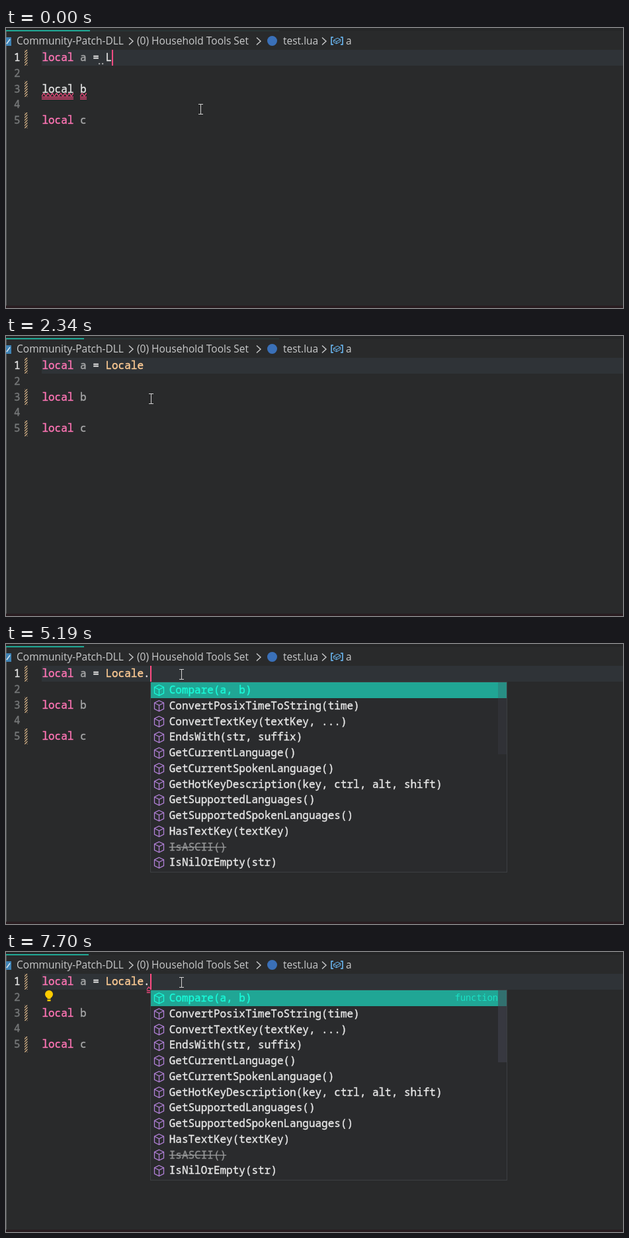
These frames come from a looping animation (933 px wide and 424 px high, 8 s). An HTML page with a canvas:

```html
<!DOCTYPE html>
<html lang="en">
<head>
<meta charset="utf-8">
<title>Lua completion</title>
<style>
  html, body { margin: 0; width: 100%; height: 100%; overflow: hidden; background: #292a2b; }
  canvas { display: block; }
</style>
</head>
<body>
<canvas id="stage" width="933" height="424"></canvas>
<script>
const ctx = document.getElementById('stage').getContext('2d');
const LOOP = 8000, CH = 9.6, LINE = 23.75, LEFT = 54.4;
const MONO = '16px "Noto Sans Mono", monospace';
const UI = '15.5px "Open Sans", sans-serif';
const C = {
  bg: '#292a2b', panel: '#2f3337', border: '#3c3f42', fg: '#e6e6e6', dim: '#a6a7a8',
  pink: '#ff75b5', caret: '#ff4b82', orange: '#ffcc95', blue: '#6fc1ff', link: '#4591d6',
  teal: '#19f9d8', selected: '#20a695', purple: '#b180d7', number: '#757778'
};
const col = n => LEFT + n * CH;

// A leading "-" marks a deprecated entry.
const members = ['Compare(a, b)', 'ConvertPosixTimeToString(time)', 'ConvertTextKey(textKey, ...)',
  'EndsWith(str, suffix)', 'GetCurrentLanguage()', 'GetCurrentSpokenLanguage()',
  'GetHotKeyDescription(key, ctrl, alt, shift)', 'GetSupportedLanguages()',
  'GetSupportedSpokenLanguages()', 'HasTextKey(textKey)', '-IsASCII()', 'IsNilOrEmpty(str)'];
const withC = [...members.slice(0, 3), 'GetCurrentLanguage()', 'GetCurrentSpokenLanguage()',
  'SetCurrentLanguage(langType)', 'SetCurrentSpokenLanguage(langType)',
  'GetHotKeyDescription(key, ctrl, alt, shift)', '-IsASCII()', '-LocalSystemCPToUTF8(...)',
  'TruncateString(str, ...)'];
const withCo = [...members.slice(0, 3), 'GetCurrentSpokenLanguage()',
  'SetCurrentSpokenLanguage(langType)', '-LocalSystemCPToUTF8(...)'];
const globals = ['Locale', 'load', 'loadfile', 'loadstring', 'LookUpControl', 'loadlib', 'select'];
const fields = ['Compare', 'ConvertPosixTimeToString', 'ConvertTextKey', 'EndsWith',
  'GetCurrentLanguage', 'GetCurrentSpokenLanguage', 'GetHotKeyDescription',
  'GetSupportedLanguages', 'GetSupportedSpokenLanguages', 'HasTextKey', 'IsASCII',
  'IsNilOrEmpty', 'IsNilOrWhitespace'];

const list = (at, query, rows) => ({ list: { at, query, rows } });
const warn = (at, n, color = C.orange) => ({ mark: { at, n, color } });

// Each step changes part of the editor state from its time on.
const steps = [
  [0, { code: 'L', caret: 1, stale: 1, hint: 1, detail: '', scroll: 0, tab: 127, strip: 1, mouse: [294, 123] }],
  [130, list(11, 'L', globals)],
  [280, { code: 'Lo', hint: 0, ...list(12, 'Lo', globals.slice(0, 6)) }],
  [410, { stale: 0, ...warn(10, 2) }],
  [550, { detail: 'Locale' }],
  [690, { code: 'Loc', ...list(13, 'Loc', ['Locale', 'LookUpControl']) }],
  [810, warn(10, 3)],
  [930, { code: 'Loca', ...list(14, 'Loca', ['Locale']) }],
  [1050, warn(10, 4)],
  [1200, { code: 'Local', tab: 125, strip: 0, ...list(15, 'Local', ['Locale']) }],
  [1320, warn(10, 5)],
  [1470, { code: 'Locale', ...list(16, 'Locale', ['Locale']) }],
  [1710, { mark: null }],
  [1860, { list: null, tab: 118, strip: 1 }],
  [1980, { caret: 0, mouse: [286, 120] }],
  [2100, { mouse: [262, 111] }],
  [2220, { mouse: [236, 101] }],
  [2340, { mouse: [219, 95] }],
  [2490, { caret: 1, mouse: [184, 63] }],
  [2640, { mouse: [181, 53] }],
  [2790, { link: 1, strip: 0, mouse: [196, 45] }],
  [2860, { hover: 1 }],
  [3030, { caret: 0 }],
  [3400, { caret: 1 }],
  [3940, { caret: 0 }],
  [4060, { hover: 0, mouse: [203, 45] }],
  [4180, { link: 0, mouse: [226, 46] }],
  [4300, { mouse: [252, 46] }],
  [4420, { caret: 1, mouse: [265, 46] }],
  [4920, { caret: 0 }],
  [5070, { caret: 1, code: 'Locale.' }],
  [5190, { detail: '', scroll: .25, ...list(17, '', members) }],
  [5310, { detail: 'function' }],
  [5460, { tab: 125 }],
  [5580, { caret: 0 }],
  [5820, { scroll: 0 }],
  [6120, { caret: 1 }],
  [6270, { code: 'Locale.C' }],
  [6420, list(18, 'C', withC)],
  [6570, warn(17, 1)],
  [6850, { code: 'Locale.Co', ...list(19, 'Co', withCo) }],
  [6970, warn(17, 2)],
  [7340, { code: 'Locale.C', ...warn(17, 1), ...list(18, 'C', withC) }],
  [7460, { code: 'Locale.', mark: null, detail: '', scroll: .25, ...list(17, '', members) }],
  [7580, { detail: 'function', scroll: .55 }],
  [7700, { bulb: 1, ...warn(16.5, .6, C.caret) }]
];

function rect(x, y, w, h, color) {
  ctx.fillStyle = color;
  ctx.fillRect(x, y, w, h);
}
function text(str, x, y, color, font = MONO) {
  ctx.font = font;
  ctx.fillStyle = color;
  ctx.fillText(str, x, y);
  if (font !== MONO) return;
  // A hairline outline gives the code its slightly heavier weight.
  ctx.strokeStyle = color;
  ctx.lineWidth = .4;
  ctx.strokeText(str, x, y);
}
function line(points, color, width = 1.3, close = false) {
  ctx.beginPath();
  points.forEach(([x, y]) => ctx.lineTo(x, y));
  if (close) ctx.closePath();
  ctx.strokeStyle = color;
  ctx.lineWidth = width;
  ctx.stroke();
}
function at(x, y, draw, scale = 1) {
  ctx.save();
  ctx.translate(x, y);
  ctx.scale(scale, scale);
  draw();
  ctx.restore();
}
function frame(x, y, w, h, fill) {
  rect(x, y, w, h, fill);
  ctx.strokeStyle = C.border;
  ctx.lineWidth = 1;
  ctx.strokeRect(x + .5, y + .5, w - 1, h - 1);
}

function cube(color) {
  line([[0, -8], [7, -4.5], [7, 4.5], [0, 8], [-7, 4.5], [-7, -4.5]], color, 1.3, true);
  line([[-7, -4.5], [0, -1], [7, -4.5]], color);
  line([[0, -1], [0, 8]], color);
}
function flatBox(color) {
  line([[-8, -1], [1, -6], [8, -3], [8, 2], [-1, 7], [-8, 3.5]], color, 1.5, true);
  line([[-8, -1], [-1, 2], [8, -3]], color, 1.5);
  line([[-1, 2], [-1, 7]], color, 1.5);
}

function underline(x, y, w, color) {
  const wave = [];
  for (let i = 0; i <= w; i++) wave.push([x + i, y + 2 * Math.cos(i * Math.PI / 3.2)]);
  line(wave, color, 1.2);
  rect(x, y + 3, w, 1.3, color);
  rect(x, y + 5.8, w, 1.3, color);
}

function breadcrumbs({ tab, strip }) {
  rect(0, 0, 933, 4, '#252627');
  if (strip) rect(0, 3.5, 413, 1.3, '#2b3c3d');
  rect(0, 3.3, tab, 1.7, '#1fbfa9');
  rect(0, 5, 1, 416, '#5a5c5d');
  rect(0, 420.5, 933, 3.5, '#291c20');
  rect(0, 14, 8, 13, '#3f83b5');
  line([[1, 24], [6, 17]], '#d7e6f2', 1.5);
  const color = '#c9cacb';
  text('Community-Patch-DLL', 16, 25, color, UI);
  text('(0) Household Tools Set', 198, 25, color, UI);
  text('test.lua', 419, 25, color, UI);
  text('a', 514, 25, color, UI);
  for (const x of [186, 379, 478]) line([[x, 14.5], [x + 6, 20], [x, 25.5]], color, 1.4);
  ctx.beginPath();
  ctx.arc(402.5, 19.5, 7.5, 0, 7);
  ctx.fillStyle = '#3a70b8';
  ctx.fill();
  line([[495, 14], [492, 14], [492, 25], [495, 25]], C.blue, 1.5);
  line([[506, 14], [509, 14], [509, 25], [506, 25]], C.blue, 1.5);
  at(500.5, 19.2, () => flatBox(C.blue), .65);
}

function gutter(row) {
  const y = 33 + row * LINE;
  text(row + 1, 12, y + 17, row ? C.number : C.fg);
  if (row % 2) return;
  ctx.save();
  ctx.beginPath();
  ctx.rect(28, y, 4.5, LINE);
  ctx.clip();
  for (let d = 0; d < 32; d += 4) line([[27, y + d + 1], [33, y + d - 5]], '#f0c794', 1.2);
  ctx.restore();
}

function editor(s) {
  rect(54, 33, 879, 24, C.panel);
  for (let row = 0; row < 5; row++) gutter(row);
  ['a', 'b', 'c'].forEach((name, i) => {
    const y = 50 + i * 2 * LINE, stale = i === 1 && s.stale;
    text('local', col(0), y, stale ? C.fg : C.pink);
    text(name, col(6), y, stale ? C.fg : C.dim);
  });
  text('=', col(8), 50, C.fg);
  if (s.stale) {
    underline(54, 101, 48, C.caret);
    underline(112, 101, 10, C.caret);
  }
  if (s.hint) for (const x of [140, 145]) rect(x, 53, 2.2, 2.2, '#9a9b9c');
  const known = s.code.startsWith('Locale') ? 6 : 0;
  text(s.code.slice(0, known), col(10), 50, s.link ? C.link : C.orange);
  text(s.code.slice(known), col(10 + known), 50, C.fg);
  if (s.link) rect(col(10), 52, 6 * CH, 1.2, C.link);
  if (s.mark) underline(col(s.mark.at), 55, s.mark.n * CH, s.mark.color);
  if (s.caret) rect(Math.round(col(10 + s.code.length)), 33, 2, 24, C.caret);
}

function entry(label, query, x, y, color) {
  let next = 0;
  [...label].forEach((ch, i) => {
    const hit = next < query.length && ch.toLowerCase() === query[next].toLowerCase();
    if (hit) next++;
    text(ch, x + i * CH, y, hit ? C.blue : color, hit ? 'bold ' + MONO : MONO);
  });
}

function completions({ list: { at: column, query, rows }, detail, scroll }) {
  const x = Math.round(col(column) + 1.2), w = 539;
  frame(x - 1, 57, w + 1, rows.length * LINE + 4, '#2a2b2d');
  rect(x, 58, w - 1, 24, C.selected);
  rows.forEach((row, i) => {
    const y = 75 + i * LINE, old = row[0] === '-';
    const label = old ? row.slice(1) : row;
    const tint = i ? C.purple : C.teal;
    at(x + 12.5, y - 5, () => label === 'Locale' ? flatBox(tint) : cube(tint));
    entry(label, old ? '' : query, x + 27.7, y, old ? '#8e8f90' : i ? C.fg : C.teal);
    if (old) rect(x + 27.7, y - 5.5, label.length * CH, 1.3, '#9a9b9c');
  });
  ctx.textAlign = 'right';
  text(detail, x + w - 14, 74, '#1be0c5', '13.6px "Noto Sans Mono", monospace');
  ctx.textAlign = 'left';
  if (scroll) rect(x + w - 14, 58, 13, 109, `rgba(66,68,80,${scroll})`);
}

function hoverCard(alpha) {
  ctx.save();
  ctx.globalAlpha = alpha;
  frame(150, 57, 427, 323, '#303338');
  ctx.beginPath();
  ctx.rect(151, 58, 425, 321);
  ctx.clip();
  let x = 161.5;
  for (const [part, color] of [['(', C.fg], ['global', C.pink], [') Locale: ', C.fg],
    ['Locale', C.blue], [' {', C.fg]]) {
    text(part, x, 80, color);
    x += part.length * CH;
  }
  fields.forEach((name, i) => text(name + ': function,', 199.9, 80 + (i + 1) * LINE, C.fg));
  ctx.restore();
}

function bulb() {
  ctx.beginPath();
  ctx.arc(65, 64, 6, 0, 7);
  ctx.fillStyle = '#ffcc00';
  ctx.fill();
  rect(62.5, 68, 5, 3, '#ffcc00');
  rect(62.5, 72, 5, 2.5, '#ffcc00');
}

function beam() {
  const shape = [[[-3, -7.5], [4, -7.5]], [[.5, -7.5], [.5, 7.5]], [[-3, 7.5], [4, 7.5]]];
  shape.forEach(p => line(p, '#d0d0d0', 1));
}
const handShape = new Path2D('M-2 1Q0-2 2 1V8Q4 6 5.5 8Q7 7 8.5 9Q11 8 11 11V15Q11 18 8.5 20V22H-1V20' +
  'Q-4 16-6 13Q-6 10-3.5 11L-2 13Z');
function hand() {
  ctx.fillStyle = '#fff';
  ctx.fill(handShape);
  ctx.strokeStyle = '#111';
  ctx.lineWidth = 1;
  ctx.stroke(handShape);
  for (const x of [2, 5, 8]) line([[x, 9], [x, 12]], '#222', 1);
}

function render(now) {
  const t = now % LOOP;
  const s = Object.assign({}, ...steps.filter(([time]) => time <= t).map(([, change]) => change));
  rect(0, 0, 933, 424, C.bg);
  breadcrumbs(s);
  editor(s);
  if (s.bulb) bulb();
  if (s.hover) hoverCard(Math.min(1, (t - 2860) / 240));
  if (s.list) completions(s);
  at(...s.mouse, s.link ? hand : beam);
  requestAnimationFrame(render);
}
requestAnimationFrame(render);
</script>
</body>
</html>
```
